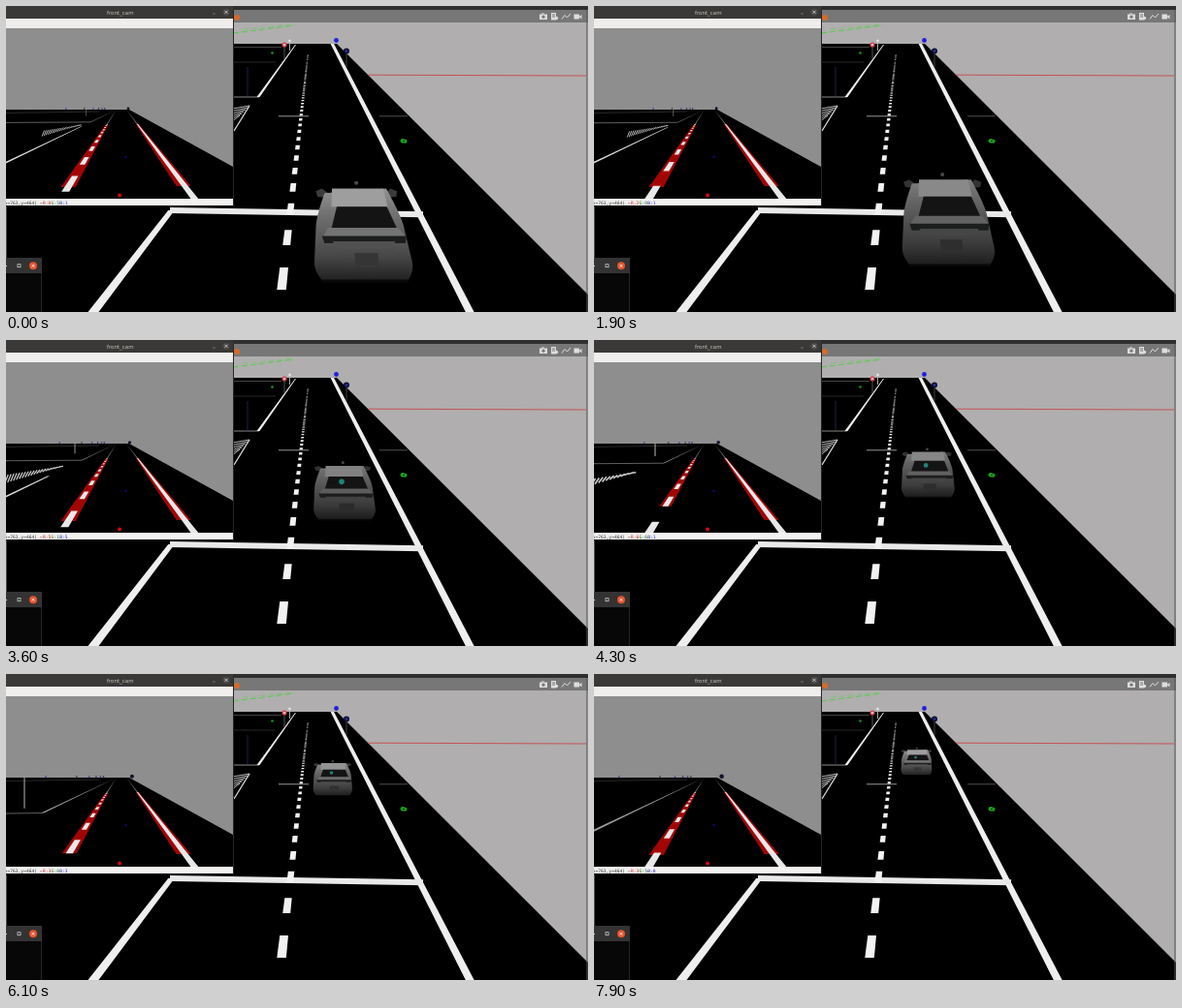
Animation, 600 px wide and 316 px high, one loop 8000 ms. Source, as an HTML page with a canvas:

```html
<!DOCTYPE html>
<html lang="en">
<head>
<meta charset="utf-8">
<title>Lane keeping simulation</title>
<style>
html, body { margin: 0; width: 100%; height: 100%; overflow: hidden; background: #000; }
canvas { display: block; }
</style>
</head>
<body>
<canvas id="stage" width="600" height="316"></canvas>
<script>
const ctx = document.getElementById('stage').getContext('2d');
const LOOP = 8000, STEP = 100;
const clamp = v => Math.min(Math.max(v, 0), 1);

function rect(x, y, w, h, color) {
  ctx.fillStyle = color;
  ctx.fillRect(x, y, w, h);
}
function poly(points, color) {
  ctx.fillStyle = color;
  ctx.beginPath();
  points.forEach(([x, y]) => ctx.lineTo(x, y));
  ctx.fill();
}
// Ground stripe with flat ends whose width grows from a to b.
function stripe(x1, y1, a, x2, y2, b, color) {
  poly([[x1 - a / 2, y1], [x1 + a / 2, y1], [x2 + b / 2, y2], [x2 - b / 2, y2]], color);
}
function line(x1, y1, x2, y2, color, width = 1) {
  ctx.strokeStyle = color;
  ctx.lineWidth = width;
  ctx.beginPath();
  ctx.moveTo(x1, y1);
  ctx.lineTo(x2, y2);
  ctx.stroke();
}
function cross(x, y, r, color) {
  line(x - r, y - r, x + r, y + r, color, 0.8);
  line(x + r, y - r, x - r, y + r, color, 0.8);
}
function dot(x, y, r, color) {
  ctx.fillStyle = color;
  ctx.beginPath();
  ctx.arc(x, y, r, 0, 7);
  ctx.fill();
}
function text(str, x, y, font, color) {
  ctx.font = font;
  ctx.fillStyle = color;
  ctx.fillText(str, x, y);
}

// Distance driven, in lane-dash periods: creep, accelerate, then cruise.
function travel(t) {
  const creep = 0.12 * Math.min(t / 1.9, 1);
  if (t < 1.33) return creep;
  return creep + (t < 2.9 ? 0.637 * (t - 1.33) ** 2 : 1.57 + 1.92 * (t - 2.9));
}

function drawWorld() {
  rect(0, 0, 600, 316, '#000');
  poly([[234, 17], [600, 17], [600, 298], [341, 39], [234, 39]], '#b0aeae');
  line(373, 71.2, 598, 72, '#c8474c', 0.9);

  // Side road
  ctx.setLineDash([6, 3]);
  line(234, 28, 297, 20, '#3ed52f', 0.8);
  line(244, 24, 297, 19, '#6fc766', 0.6);
  ctx.setLineDash([]);
  line(234, 42.5, 284, 42.5, '#555', 0.8);
  line(234, 58, 278, 58, '#333', 0.8);
  line(234, 94, 261, 94, '#888');
  stripe(298.5, 40, 1, 260, 94, 3, '#eee');
  for (let i = 0; i < 6; i++) line(234, 106 + i * 2.5, 251 - i * 2, 103 + i * 2, '#ccc', 0.9);
  line(251, 103, 235, 129, '#ddd', 1.3);
  line(281, 113.8, 312, 113.8, '#aaa', 0.9);
  line(385, 113.8, 414, 113.8, '#666', 0.8);

  // Lane markings
  stripe(336.3, 39, 3.5, 478.2, 316, 8.8, '#eee');
  stripe(170.5, 211, 6.5, 90, 316, 11, '#eee');
  line(169, 211, 430, 215.2, '#e9e9e9', 6);
  for (let i = 0; i < 120; i++) {
    const near = 1 / (0.003953 + i * 0.00088), far = 1 / (0.00435 + i * 0.00088);
    const x = d => 312.4 - 0.112 * d, width = d => 0.7 + d * 0.035;
    stripe(x(far), 40 + far, width(far), x(near), 40 + near, width(near), '#f2f2f2');
  }

  // Signs and markers
  line(287, 42, 287, 55, '#555');
  dot(287, 40, 2.6, '#d23c48');
  dot(287, 40, 1.3, '#d8c4c4');
  line(292.5, 34, 292.5, 46, '#bbb', 0.9);
  dot(292.5, 36, 1.3, '#e8e8e8');
  dot(274.5, 48.5, 1.3, '#159a1c');
  line(249, 63, 249, 93, '#1a1a38', 1.3);
  dot(340.5, 35.5, 2.4, '#2020dd');
  line(351, 48, 351, 63, '#444');
  dot(351, 46.5, 3, '#101038');
  dot(351, 46.5, 1.2, '#2736a0');
  dot(409, 139.3, 2.4, '#16a51d');
  dot(411.5, 139.8, 2, '#16a51d');
  rect(409, 139, 2, 1, '#0a390c');
}

// u runs across the car, v from the road (0) to the roof (1).
function drawCar(p, t) {
  const w = 1 / (0.0099 + 0.00201 * p), h = w * (0.79 + 0.0014 * w);
  const cx = 316 + 0.536 * w, base = 26 + 2.54 * w;
  const skew = -0.0013 * (w - 31), taper = 0.0025 * w;
  const at = (u, v) => [cx + w * (u * (1 - taper * v) + skew * v), base - h * v];
  const band = (v1, half1, v2, half2, color, shift = 0) => poly([
    at(shift - half1, v1), at(shift + half1, v1), at(shift + half2, v2), at(shift - half2, v2)], color);
  const light = t < 3 ? 155 - 11 * t : 122 + 7 * Math.min(t - 3, 5);
  const gray = k => {
    const c = Math.round(light * k);
    return `rgb(${c},${c},${c})`;
  };

  band(-.03, .44, .15, .48, '#080808');
  for (const side of [-1, 1]) {
    poly([at(side * .36, .9), at(side * .52, .91), at(side * .55, .97), at(side * .47, 1), at(side * .38, .95)], gray(.38));
  }

  const half = v => .525 - .115 * clamp((v - .6) / .4) ** 1.5 - .08 * (1 - clamp(v / .2)) ** 2;
  const outline = [];
  for (let i = 0; i <= 40; i++) {
    const v = i < 20 ? i / 20 : (40 - i) / 20;
    outline.push(at(half(v) * (i < 20 ? -1 : 1), v));
  }
  const paint = ctx.createLinearGradient(0, base - h, 0, base);
  [.95, .75, .6, .45, .22].forEach((k, i) => paint.addColorStop(i / 4, gray(k)));
  poly(outline, paint);

  band(.8, .36, 1, .35, gray(1.02), .02);
  band(.56, .39, .8, .32, '#141414', .05);
  band(.47, .48, .57, .42, gray(.74), .04);
  band(.4, .46, .48, .49, '#1c1d1d', .04);
  band(.34, .3, .42, .36, gray(.52), .03);
  band(.16, .12, .29, .13, gray(.34), .04);

  const [mx, my] = at(.01, 1.06);
  dot(mx, my, 0.6 + w * .014, '#4a4a4a');
  if (t >= 3.3) dot(...at(-.03, .7), Math.max(w * .045, 1.3), '#1f8378');
}

// Camera ground stripe: slope and width are per pixel below the horizon.
function drawLane(top, bottom, slope, origin, width, color) {
  const a = top - 107, b = bottom - 107;
  stripe(origin + slope * a, top, width * a, origin + slope * b, bottom, width * b, color);
}

function drawCamera(p, step) {
  ctx.save();
  ctx.beginPath();
  ctx.rect(0, 23, 234, 176);
  ctx.clip();
  rect(0, 23, 234, 176, '#8e8e8e');
  poly([[0, 107], [127, 107], [234, 166], [234, 199], [0, 199]], '#000');

  // Left border with its junction gap
  const yOf = u => 107 + 1 / Math.max(u, 0.006);
  const far = yOf(0.0775 - 0.0064 * p), near = yOf(0.058 - 0.0093 * p);
  drawLane(109, far, -2.09, 114, 0.09, '#999');
  drawLane(near, 199, -2.09, 114, 0.07, '#ddd');
  line(0, far + .5, 114 - 2.09 * (far - 107), far, '#777', 0.8);
  line(0, 110.5, 96, 109, '#333', 0.8);

  // Hatched island
  const s = 1 / Math.max(0.0645 - 0.0069 * p, 0.006), tipX = 117 - 2.4 * s, tipY = 107 + s;
  for (let i = 1; i < 21; i++) {
    const d = 0.13 * i;
    line(tipX - d * s, tipY + d * .15 * s, tipX - (d + .15) * s, tipY + d * .3 * s, '#ccc', Math.max(s * .055, .7));
  }

  // Roadside objects
  const gap = 1 - 0.13 * (p - 4.38);
  if (gap > 0.3) {
    const x = 117 - 54 / gap;
    ctx.globalAlpha = clamp(2 - gap);
    line(x, 105.5, x, 107 + 13 / gap ** 1.5, '#999', 1.2);
    ctx.globalAlpha = 1;
  }
  for (let i = 0; i < 6; i++) {
    const x = 117 - 95 / (1 + i * .9 + (12 - p) * .06);
    dot(x, 106, 0.8, i % 2 ? '#20203a' : '#2929ab');
  }
  dot(126 + 0.5 * p, 105.8, 1.4 + p * .08, '#11132b');

  // Detected lanes
  const PERIOD = 0.00583, RED = '#a30505';
  const phase = ((0.0146 - PERIOD * p) % PERIOD + PERIOD) % PERIOD;
  const dashes = [];
  for (let i = 1; i < 12; i++) {
    const u = phase + i * PERIOD;
    dashes.push([yOf(u), Math.min(yOf(u - 0.0028), 199)]);
  }
  const nearest = dashes.find(([top]) => top < 187);
  drawLane(108, 123, -0.62, 113.7, 0.07, '#777');
  drawLane(123, Math.min(nearest[1], 187), -0.62, 113.7, 0.19, RED);
  for (const [top, bottom] of dashes) {
    if (top < 199) drawLane(top, bottom, -0.62, 113.7, 0.095, '#e8e8e8');
  }
  drawLane(108, 122, 0.76, 124, 0.08, '#777');
  drawLane(122, 186, 0.75, 124, 0.19, RED);
  drawLane(122, 199, 0.765, 124, 0.085, '#e8e8e8');
  dot(117, 195.5, 2, '#d80808');
  dot(123.5, 156, 1.2, '#0a0a75');
  ctx.restore();

  // Window frame
  rect(0, 0, 234, 13, '#3a3937');
  rect(0, 13, 234, 10, '#f0eeec');
  rect(0, 199, 234, 7, '#f3f2f1');
  rect(234, 4, 1, 203, '#252525');
  text('front_cam', 104, 8.5, '5.5px "DejaVu Sans", sans-serif', '#c4c1bc');
  line(213.5, 8, 215.5, 8, '#aaa', 0.7);
  dot(227, 6.3, 3.6, '#4a4947');
  cross(227, 6.3, 1.5, '#ddd');

  const font = '4.6px "DejaVu Sans Mono", monospace';
  const digit = k => Math.floor(Math.abs(Math.sin(step * 12.9 + k * 3.7) * 437.5) % 1 * 7);
  text('(x=763,y=464) ~', -4, 204.6, font, '#333');
  ['#c22', '#187018', '#22b'].forEach((color, i) =>
    text('RGB'[i] + ':' + digit(i), 38 + i * 8.6, 204.6, font, color));
}

function drawChrome() {
  rect(234, 0, 366, 4, '#302f2f');
  rect(234, 4, 366, 13, '#777');
  rect(598.5, 4, 1, 312, '#555');
  dot(238, 12, 3, '#d56b2b');

  // Toolbar icons
  const ICON = '#ddd';
  rect(550, 8.5, 8, 5.5, ICON);
  rect(552, 7.5, 3, 1, ICON);
  dot(554, 11.2, 1.6, '#777');
  rect(562, 7, 5, 7.5, ICON);
  for (const y of [8.5, 10.5]) rect(563, y, 3, 1, '#777');
  dot(567.5, 12.5, 1.7, ICON);
  line(573, 13.5, 576, 9.5, ICON);
  line(576, 9.5, 578.5, 12, ICON);
  line(578.5, 12, 582, 8, ICON);
  rect(585.5, 8.5, 5.5, 5, ICON);
  poly([[590.5, 11], [593.5, 9], [593.5, 13.5]], ICON);

  // Small window
  rect(0, 207, 1, 53, '#444');
  rect(0, 260, 37, 56, '#333');
  rect(0, 276, 36.3, 40, '#080708');
  line(0, 268.5, 1, 268.5, '#ccc');
  ctx.strokeStyle = '#ccc';
  ctx.lineWidth = 0.8;
  ctx.strokeRect(12, 266.7, 3, 3);
  dot(28, 268.3, 4, '#e5532d');
  cross(28, 268.3, 1.4, '#fff');
}

function frame(now) {
  const step = Math.floor(now % LOOP / STEP), t = step * STEP / 1000, p = travel(t);
  drawWorld();
  drawCar(p, t);
  drawChrome();
  drawCamera(p, step);
  requestAnimationFrame(frame);
}
requestAnimationFrame(frame);
</script>
</body>
</html>
```
